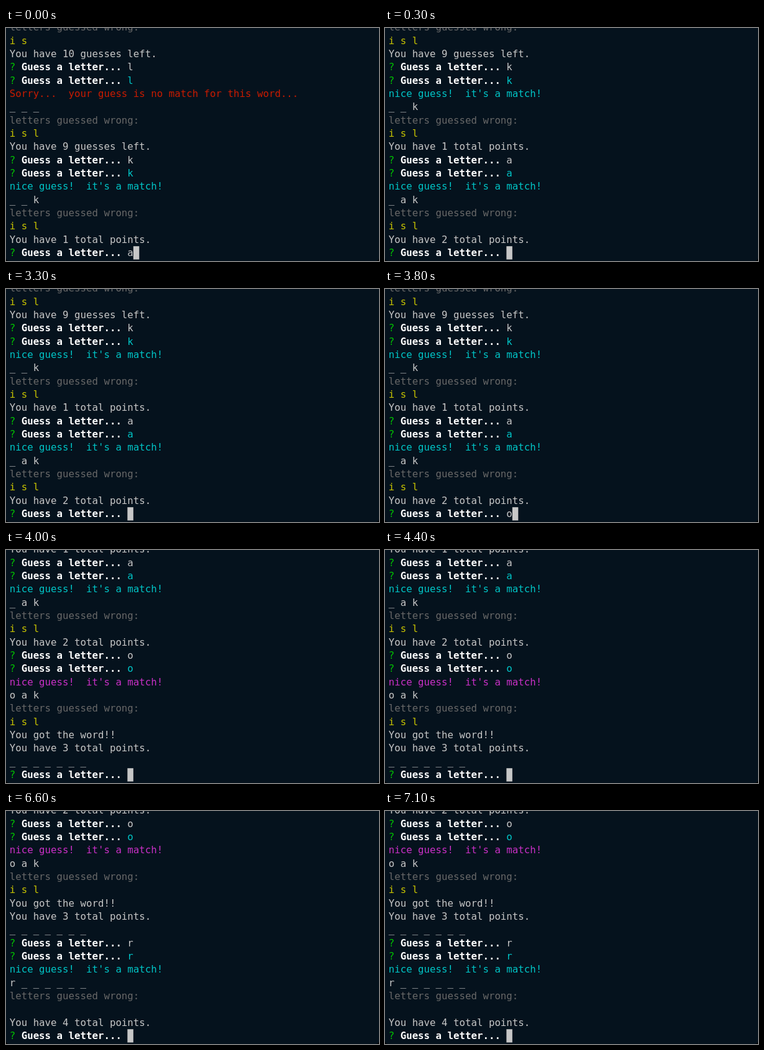
An HTML page with a canvas that plays this animation: 600x375 px, repeating every 8 s.

```html
<!DOCTYPE html>
<html lang="en">
<head>
<meta charset="utf-8">
<title>Word guessing game</title>
<style>
  html, body { margin: 0; width: 100%; height: 100%; overflow: hidden; background: #000; }
  canvas { display: block; width: 600px; height: 375px; background: #05121d; border-radius: 0 0 5px 5px; }
</style>
</head>
<body>
<canvas></canvas>
<script>
const WIDTH = 600, HEIGHT = 375, LOOP = 8000;
const LEFT = 5.7, CELL = 9.482, LINE = 21.34, LAST_BASELINE = 367;
const FONT = '15.75px "DejaVu Sans Mono", monospace';
const PROMPT = 'Guess a letter...', INPUT_COLUMN = 20;
const GREY = '#686868', WHITE = '#c7c7c7', BRIGHT = '#ffffff', YELLOW = '#c7c400',
      GREEN = '#00c200', CYAN = '#00c5c7', RED = '#c91b00', MAGENTA = '#c930c7';
const MATCH = "nice guess!  it's a match!";
const MISS = 'Sorry...  your guess is no match for this word...';

const plain = (text, color = WHITE) => ({ text, color });
const prompt = (letter, color = WHITE) => ({ prompt: true, text: letter, color });
const tally = wrong => [plain('letters guessed wrong:', GREY), plain(wrong, YELLOW)];

// One turn: typed letter, its confirmed echo, the verdict and the new status.
const turn = (letter, verdict, color, word, wrong, ...status) => [
  prompt(letter), prompt(letter, CYAN), plain(verdict, color), plain(word),
  ...tally(wrong), ...status.map(text => plain(text))
];

const transcript = [
  ...tally('i s'), plain('You have 10 guesses left.'),
  ...turn('l', MISS, RED, '_ _ _', 'i s l', 'You have 9 guesses left.'),
  ...turn('k', MATCH, CYAN, '_ _ k', 'i s l', 'You have 1 total points.'),
  ...turn('a', MATCH, CYAN, '_ a k', 'i s l', 'You have 2 total points.'),
  ...turn('o', MATCH, MAGENTA, 'o a k', 'i s l',
          'You got the word!!', 'You have 3 total points.', '_ _ _ _ _ _ _'),
  ...turn('r', MATCH, CYAN, 'r _ _ _ _ _ _', '', 'You have 4 total points.'),
  prompt('')
];

// Each state shows the transcript up to a line count, with the last letter typed or not.
const states = [
  { at: 0, lines: 18, typed: true },
  { at: 100, lines: 25, typed: false },
  { at: 3600, lines: 25, typed: true },
  { at: 4000, lines: 34, typed: false },
  { at: 6400, lines: 34, typed: true },
  { at: 6600, lines: 41, typed: false }
];

const canvas = document.querySelector('canvas');
const scale = window.devicePixelRatio || 1;
canvas.width = WIDTH * scale;
canvas.height = HEIGHT * scale;
const ctx = canvas.getContext('2d');
ctx.scale(scale, scale);

function write(text, column, y, color, bold) {
  ctx.font = (bold ? 'bold ' : '') + FONT;
  ctx.fillStyle = color;
  ctx.fillText(text, LEFT + column * CELL, y);
}

function draw({ lines, typed }) {
  ctx.clearRect(0, 0, WIDTH, HEIGHT);
  for (let row = 0; row < 18; row++) {
    const line = transcript[lines - 1 - row];
    const y = LAST_BASELINE - row * LINE;
    if (line.prompt) {
      write('?', 0, y, GREEN);
      write(PROMPT, 2, y, BRIGHT, true);
      if (row > 0 || typed) write(line.text, INPUT_COLUMN, y, line.color);
    } else {
      write(line.text, 0, y, line.color);
    }
  }
  ctx.fillStyle = WHITE;
  ctx.fillRect(LEFT + (INPUT_COLUMN + typed) * CELL, 351.2, CELL, LINE);
}

const start = performance.now();
function tick() {
  const time = (performance.now() - start) % LOOP;
  draw(states.findLast(state => state.at <= time));
  requestAnimationFrame(tick);
}
tick();
</script>
</body>
</html>
```
